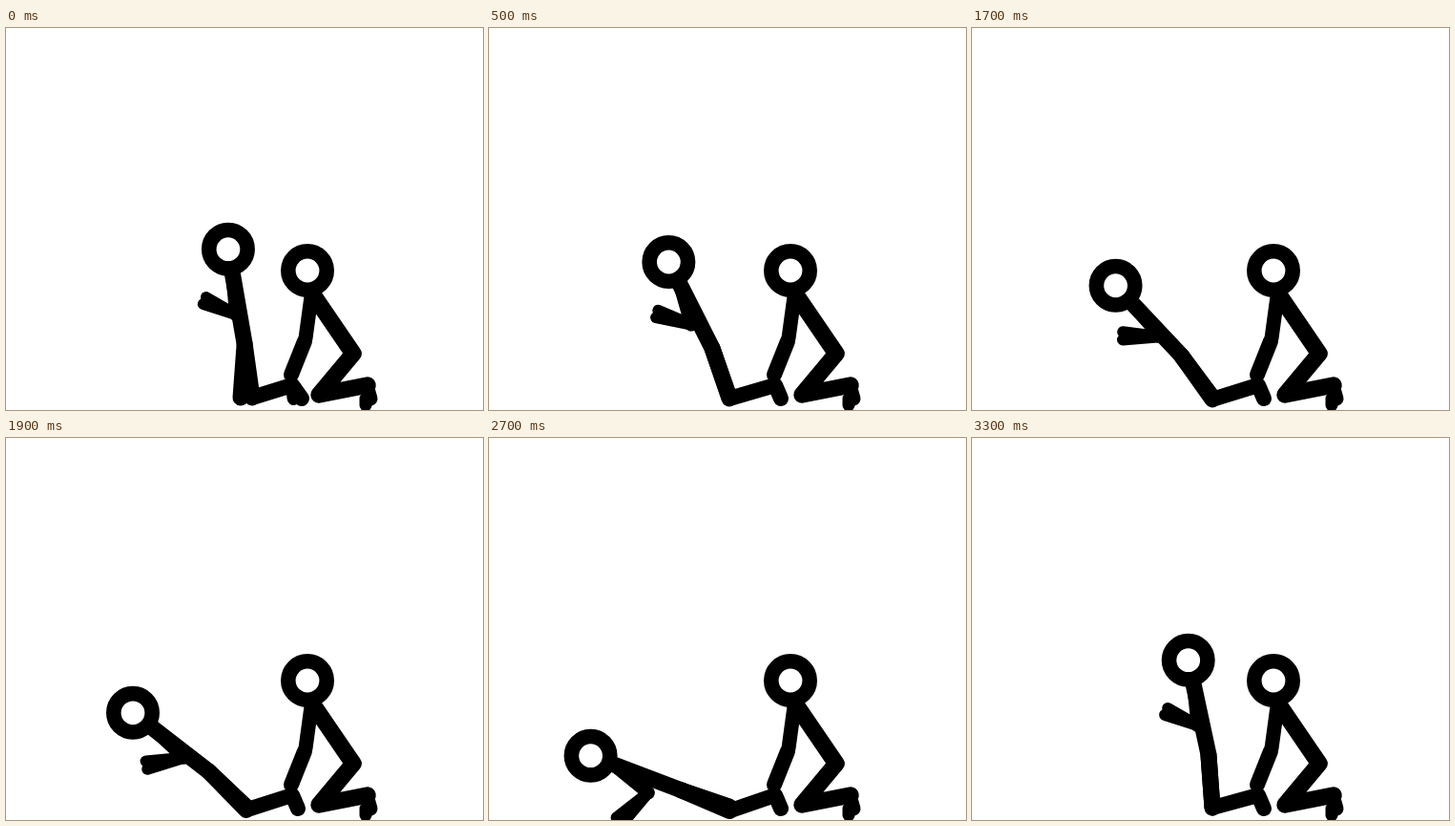
Animation of 500x400 px, one loop 3400 ms. Source, as an HTML page with a canvas:

```html
<!DOCTYPE html>
<html lang="en">
<head>
<meta charset="utf-8">
<title>Kneeling curl</title>
<style>
html, body { margin: 0; height: 100%; overflow: hidden; background: #fff; }
canvas { display: block; }
</style>
</head>
<body>
<canvas id="stage" width="500" height="400"></canvas>
<script>
const ctx = document.getElementById('stage').getContext('2d');
const LOOP = 3400;

// The slow descent moves at these times; elsewhere every 100 ms
const SLOW = [300, 500, 700, 900, 1000, 1200, 1500, 1700];

// Key poses: time, body angle, upper arm angle
const KEYS = [
  [0, 83, 85],
  [500, 66, 74],
  [1500, 58.7, 57],
  [1900, 40.5, 43],
  [2300, 13.8, 1],
  [2400, 9.4, 0],
  [2700, 21.7, 39],
  [3300, 80.7, 84]
];

const hold = t => t >= 300 && t < 1700
  ? SLOW.findLast(s => s <= t)
  : Math.floor(t / 100) * 100;

function poseAt(t) {
  const next = KEYS.findIndex(k => k[0] > t);
  if (next < 0) return KEYS[KEYS.length - 1];
  const a = KEYS[next - 1], b = KEYS[next];
  const f = (t - a[0]) / (b[0] - a[0]);
  return a.map((v, i) => v + (b[i] - v) * f);
}

const polar = ([x, y], deg, len) => {
  const r = deg * Math.PI / 180;
  return [x + Math.cos(r) * len, y + Math.sin(r) * len];
};

function limb(width, ...points) {
  ctx.lineWidth = width;
  ctx.beginPath();
  points.forEach(p => ctx.lineTo(...p));
  ctx.stroke();
}

function head([x, y]) {
  ctx.lineWidth = 15.6;
  ctx.beginPath();
  ctx.arc(x, y, 20.2, 0, Math.PI * 2);
  ctx.stroke();
}

function drawHelper() {
  head([316, 254]);
  limb(15, [320, 281], [314, 325]);
  limb(16, [313, 328], [299, 363]);
  limb(17.5, [323, 281], [364, 341], [328, 384], [379, 374]);
  limb(15, [378, 374], [382, 388]);
  limb(13, [377, 388], [377, 395]);
}

function drawAthlete([t, body, upper]) {
  const low = Math.max(0, (83 - body) / 69); // 0 upright, about 1 near the floor
  const spread = Math.max(0, 12 - t / 25);
  const base = [252, 387 + 4 * low];
  const up = body + 180;
  const skull = polar(base, up, 156.5);
  const bend = Math.min(5, Math.max(0, (body - 14) / 5));
  const hip = polar(polar(base, up, 56), up + 90, bend);
  const spine = Math.atan2(hip[1] - skull[1], hip[0] - skull[0]) * 180 / Math.PI;
  const neck = polar(skull, spine, 25);
  const elbow = polar(neck, upper, 44 + 4 * low);
  const fore = 204 - 84 * low ** 1.8;
  const heel = [300, 374];
  const toe = [306 + spread / 3, 388];
  const nearKnee = [base[0] + spread / 2, base[1]];
  const farKnee = [base[0] - spread / 2, base[1] - 5 * low];

  head(skull);
  limb(17, neck, hip, nearKnee);
  limb(17, hip, farKnee);
  limb(16, nearKnee, heel, toe);
  limb(14, heel, [toe[0] - spread * 0.7, toe[1]]);
  limb(14, neck, elbow);
  for (const side of [-6, 6]) limb(12, elbow, polar(elbow, fore + side, 36 + 7 * low));
}

function frame(now) {
  ctx.fillStyle = '#fff';
  ctx.fillRect(0, 0, 500, 400);
  ctx.strokeStyle = '#000';
  ctx.lineCap = ctx.lineJoin = 'round';
  drawHelper();
  drawAthlete(poseAt(hold(Math.max(0, now - start) % LOOP)));
  requestAnimationFrame(frame);
}

const start = performance.now();
frame(start);
</script>
</body>
</html>
```
